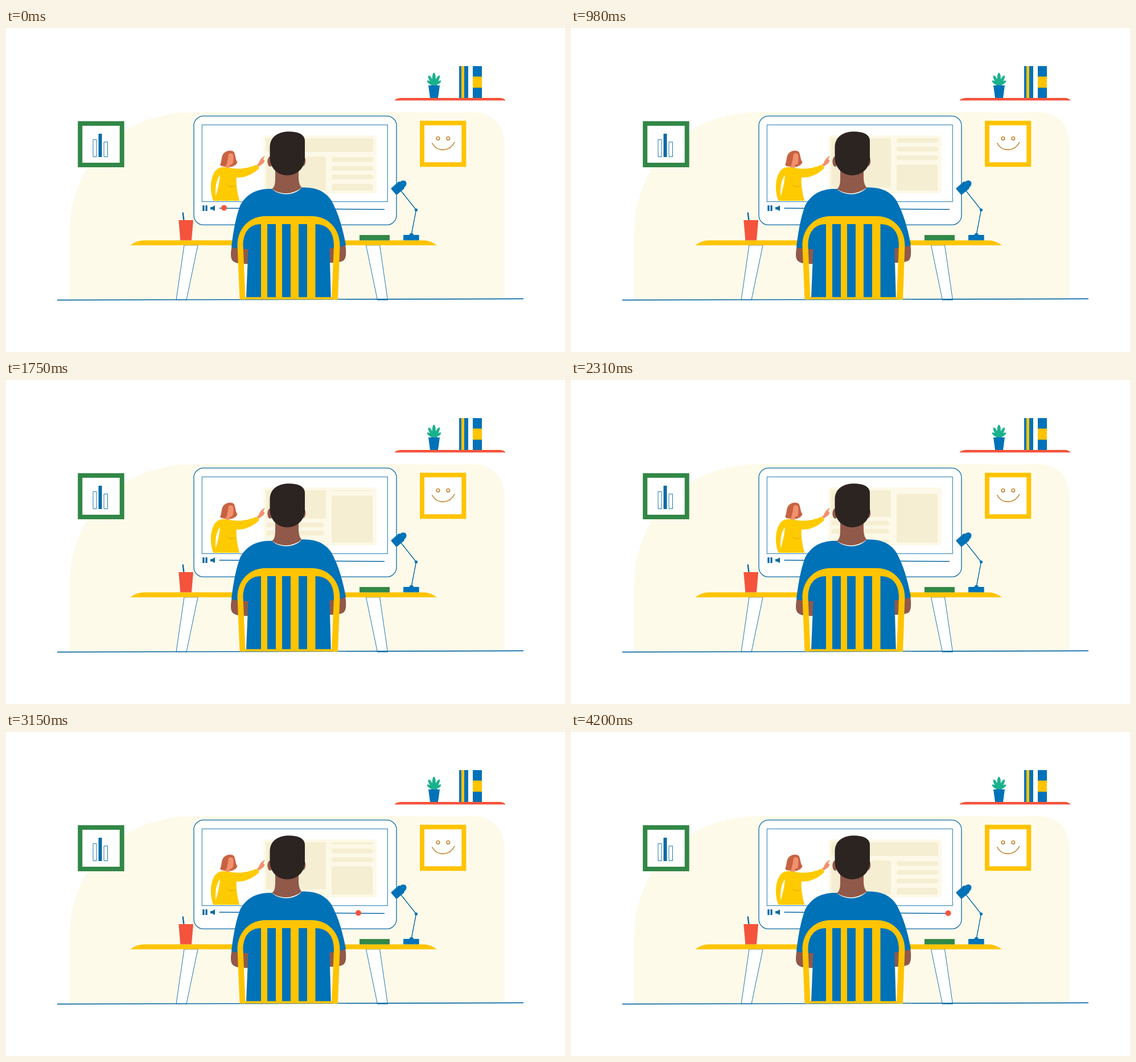
Animation of 982x570 px, one loop 4270 ms. Source, as an HTML page:

```html
<!DOCTYPE html>
<html lang="en">
<head>
<meta charset="utf-8">
<title>Online lesson</title>
<style>
  html, body { margin: 0; width: 100%; height: 100%; overflow: hidden; background: #fff; }
  svg { display: block; width: 982px; height: 570px; }
  .blue { fill: #0072b8; }
  .yellow { fill: #ffc400; }
  .red { fill: #f4533c; }
  .green { fill: #318746; }
  .skin { fill: #91594a; }
  .peach { fill: #f3906e; }
  .line { fill: none; stroke: #0b6aa3; }
  .page { fill: #f5eed2; }

  /* Both motions end at 4200 ms and hold for the last 70 ms. */
  .scroll { animation: scroll 4270ms cubic-bezier(.37, 0, .63, 1) infinite; }
  .knob { animation: seek 4270ms cubic-bezier(.333, 0, .667, 1) infinite; }
  @keyframes scroll {
    0%, 98.361%, 100% { transform: translateY(0); }
    49.18% { transform: translateY(-75.5px); }
  }
  @keyframes seek {
    0% { transform: translate(383px, 316.5px); }
    98.361%, 100% { transform: translate(662.6px, 318.7px); }
  }
</style>
</head>
<body>
<svg viewBox="0 0 982 570" xmlns="http://www.w3.org/2000/svg">
  <defs>
    <clipPath id="view"><rect x="457" y="194" width="189" height="92"/></clipPath>
  </defs>

  <path fill="#fefaea" d="M111 478V365C111 235 205 148 330 148H822C854 148 876 172 876 204V477Z"/>

  <!-- Shelf -->
  <g>
    <path class="red" d="M682.5 127.5C684 124.5 690 123 696 123H866C872 123 876 124.5 877.5 127.5Z"/>
    <path class="blue" d="M742 101H762L759 123H745Z"/>
    <g fill="#1bb18d">
      <ellipse cx="751.8" cy="89.5" rx="3.2" ry="11"/>
      <ellipse cx="746.5" cy="91.5" rx="2.7" ry="9" transform="rotate(-28 746.5 91.5)"/>
      <ellipse cx="757.3" cy="91.5" rx="2.7" ry="9" transform="rotate(28 757.3 91.5)"/>
      <ellipse cx="745" cy="96.5" rx="2.3" ry="6.5" transform="rotate(-55 745 96.5)"/>
      <ellipse cx="758.8" cy="96.5" rx="2.3" ry="6.5" transform="rotate(55 758.8 96.5)"/>
      <path d="M746 93H758L757 101H747Z"/>
    </g>
    <path class="blue" d="M796 67H812V123H796ZM820 67H836V123H820Z"/>
    <path class="yellow" d="M800 67H805V123H800ZM820 85.5H836V105H820Z"/>
  </g>

  <!-- Wall pictures -->
  <rect x="130.2" y="168" width="73.5" height="73" fill="#fff" stroke="#318746" stroke-width="8"/>
  <path class="line" stroke-width=".9" d="M153 196.5H159V226.5H153ZM172 200.5H178.5V226.5H172Z"/>
  <rect x="162.5" y="186" width="6" height="41" fill="#0b6aa3"/>
  <rect x="731" y="167.2" width="73.3" height="73" fill="#fff" stroke="#ffc400" stroke-width="8"/>
  <g fill="none" stroke="#bb7817" stroke-width="1.4">
    <circle cx="759" cy="194.2" r="2.8"/>
    <circle cx="776.8" cy="194.2" r="2.8"/>
    <path d="M748.3 202C757 218.5 779 218.5 788 200.5"/>
  </g>

  <!-- Monitor -->
  <rect class="line" style="fill:#fff" x="330" y="154.8" width="356" height="191.6" rx="17" stroke-width="1.3"/>
  <rect class="line" x="344.3" y="170.4" width="326" height="135.2" stroke-width=".9"/>
  <rect x="452.5" y="189" width="198.5" height="102" rx="5" fill="#fdf9e8"/>
  <g clip-path="url(#view)">
    <g class="scroll page">
      <rect x="457" y="194" width="188" height="24" rx="3"/>
      <rect x="457" y="226" width="105" height="88.5" rx="3"/>
      <rect x="572" y="227.3" width="73" height="8.2" rx="4"/>
      <rect x="572" y="242.7" width="73" height="8.2" rx="4"/>
      <rect x="572" y="258" width="73" height="8.2" rx="4"/>
      <rect x="572" y="274" width="72" height="87.5" rx="4"/>
      <rect x="457" y="321.3" width="102" height="8.2" rx="4"/>
      <rect x="457" y="335.5" width="102" height="8.2" rx="4"/>
      <rect x="457" y="355" width="102" height="8.2" rx="4"/>
    </g>
  </g>
  <path fill="#0b6aa3" d="M345.3 312H348.6V322H345.3ZM350.4 312H353.7V322H350.4ZM359 315H362L367 312V322L362 319.3H359Z"/>
  <path class="line" stroke-width="1.4" d="M374.5 317L665 319.2"/>
  <circle class="knob red" r="5"/>

  <!-- Teacher -->
  <g>
    <path fill="#c76342" d="M382 221C387 215 398 214 401 219C403 224 403 231 406.5 236C405 242 396 246 387 244C382 244 378 243 376 241C379 236 378 226 382 221Z"/>
    <path class="peach" d="M391 222C393 220 398 220 399 223C400 230 400 238 397 240L393 241V247H384C388 243 390 230 391 222Z"/>
    <path fill="#fecb00" d="M377 245.5C382 244 386 245 391 246L399 247C415 249 430 245 440 240.5Q445 242 444.5 247C434 257 420 264 405 263C404 272 405 283 410 304H364.5C359 292 358 271 364 258C367 251 371 247 377 245.5Z"/>
    <path fill="#fff" d="M375.5 259C376 269 372 283 368.5 296C367 283 369 268 375.5 259Z"/>
    <path fill="#eeb400" d="M387 275C392 278 399 279 405 277C402 281 392 282 387 275Z"/>
    <path class="peach" d="M441 240.5C445 238 445 233 448 230L453.5 225.2Q455.3 225 454 227L451.7 231.5Q455 232 454 235C452 239 449 240 444.5 243.5Z"/>
  </g>

  <!-- Table -->
  <path class="line" style="fill:#fff" stroke-width=".9" d="M313 382H337L317 478.5H299ZM632.5 382H656.5L670.5 478.5H652.5Z"/>
  <path class="yellow" d="M218 382.3C226 377 232 373.5 244 373.5H732C744 373.5 750 378 757.5 382.3Z"/>
  <path class="red" d="M303.3 338H329L326 373.5H306.3Z"/>
  <path stroke="#0b6aa3" stroke-width="2.4" d="M310.7 324.5L312.3 338"/>
  <rect class="green" x="621" y="364.2" width="53" height="9.4"/>

  <!-- Lamp -->
  <g class="blue">
    <path class="line" stroke-width="1.4" d="M712.5 362L720.5 320L692 284"/>
    <circle cx="720.5" cy="320" r="2.6"/>
    <circle cx="712.3" cy="364.3" r="3.6"/>
    <rect x="698" y="364" width="27.7" height="9.6" rx="1"/>
    <path d="M677 281.5L689.5 270.5Q691 269.5 692 271C695 267.5 701 267 703 271C704.5 275 702 279 699.5 280.5Q700.5 282 699 283L687 293Q685.5 294 684.5 292.5L676.8 283.5Q676 282.3 677 281.5Z"/>
  </g>

  <path class="line" stroke-width="1.7" d="M90 478.7L909 476.4"/>

  <!-- Student -->
  <g>
    <path class="skin" d="M397 382C394 398 394 407 400 411Q406 415.5 426 415V382ZM596 379C598 394 598 405 593 409Q587 413 567 413V382Z"/>
    <path class="blue" d="M467 283C480 296 507 296 520 280.5C545 279.5 562 288 572 304C585 328 592 355 597 381.5Q592 385 568.3 388L570.8 474H422L425.5 389Q405 389 396 385.5C399 360 403 335 411 313C422 292 440 282 467 283Z"/>
    <path class="skin" d="M473 244V266Q473 280 467 283.2Q493 300 520 280.7Q515 278 514 265V244Z"/>
    <ellipse class="skin" cx="464" cy="235" rx="4.6" ry="9"/>
    <ellipse class="skin" cx="522" cy="234" rx="4.2" ry="9"/>
    <path fill="#2c2421" d="M463.5 209C464 190 480 182.3 497 182.3C513 182.3 525 187 525 199V228C525 246 512 259.2 494 259.2C476 259.2 463.5 245 463.5 228Z"/>
  </g>

  <!-- Chair -->
  <g class="yellow">
    <path d="M410.5 477.5L406.5 383C406.5 352 428 331 456 331H537C565 331 586.5 352 586.5 383L583 477.5H572L576 383C576 360 566 345 543 345H448C427 345 416.5 360 416.5 383L420.5 477.5Z"/>
    <path d="M448 343H459V475H448ZM474 343H485V475H474ZM500 343H514V475H500ZM529 343H543.5V475H529ZM411 473.5H583V477.5H411Z"/>
  </g>
</svg>
</body>
</html>
```
